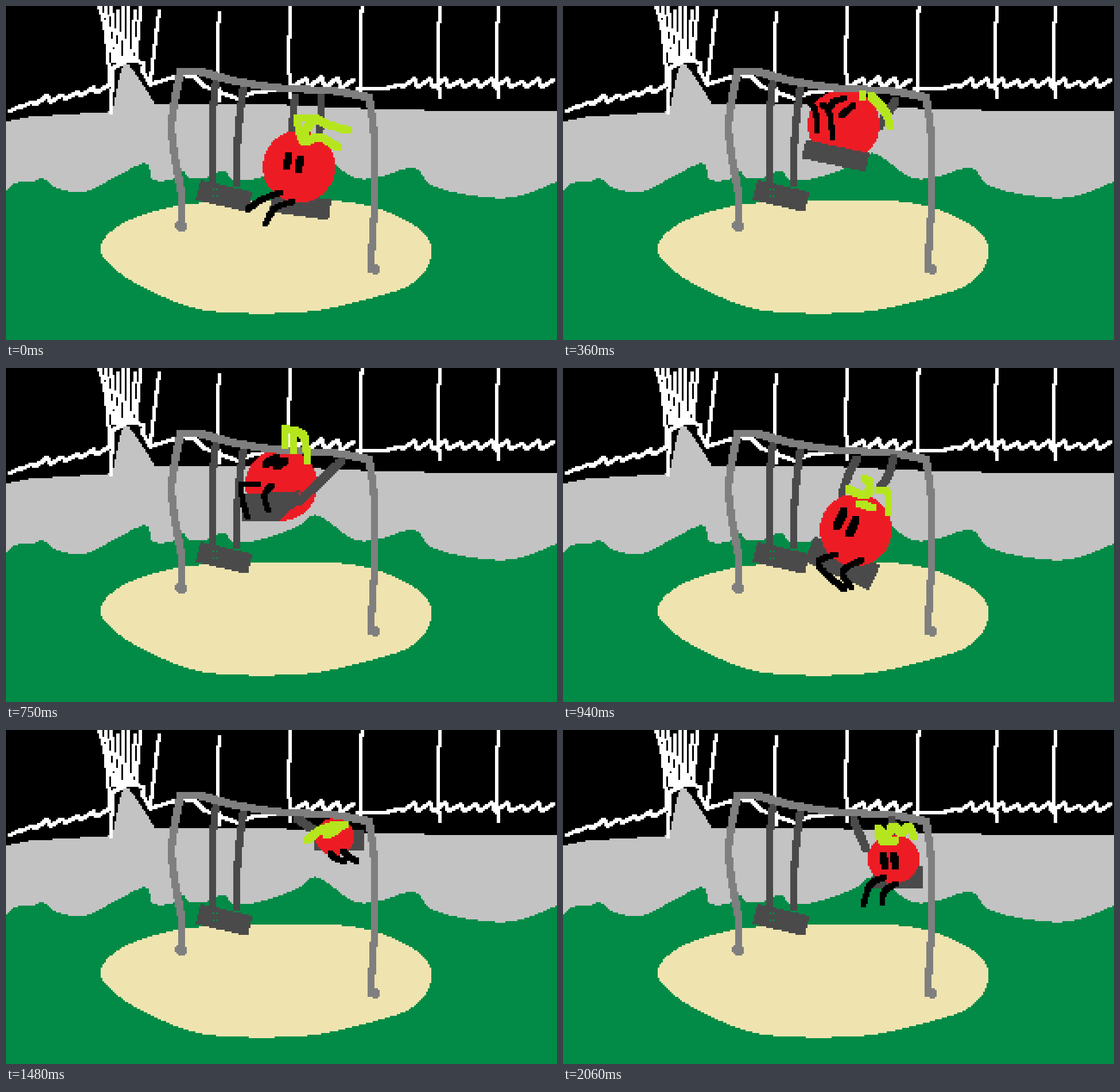
These frames come from a looping animation (960x582 px, 2240 ms). An HTML page with a canvas:

```html
<!DOCTYPE html>
<html lang="en">
<head>
<meta charset="utf-8">
<title>Tomato on a swing</title>
<style>
  html, body { margin: 0; width: 100%; height: 100%; overflow: hidden; background: #000; }
  canvas { display: block; width: 960px; height: 582px; image-rendering: pixelated; }
</style>
</head>
<body>
<canvas id="stage" width="320" height="194"></canvas>
<script>
// Coordinates are stage pixels; everything is rasterised hard-edged on a 3px grid.
const CELL = 3, W = 320, H = 194;
const ROCK = '#c3c3c3', GRASS = '#028b46', SAND = '#efe4b0', STEEL = '#7f7f7f';
const DARK = '#4a4a4a', RED = '#ed1c24', LIME = '#b5e61d', INK = '#000', WHITE = '#fff';

const stage = document.getElementById('stage').getContext('2d');
const backdrop = document.createElement('canvas');
backdrop.width = W;
backdrop.height = H;
let ctx = backdrop.getContext('2d');

let seed = 7;
function random() {
  seed = seed * 16807 % 2147483647;
  return seed / 2147483647;
}

const points = text => text.trim().split(/\s+/).map(p => p.split(',').map(Number));

// Catmull-Rom spline through a few key points
function curve(text, closed = false) {
  const pts = points(text), n = pts.length, out = [];
  const at = i => closed ? pts[(i + n) % n] : pts[Math.min(n - 1, Math.max(0, i))];
  for (let i = 0; i < (closed ? n : n - 1); i++) {
    const [a, b, c, d] = [-1, 0, 1, 2].map(k => at(i + k));
    for (let s = 0; s < 8; s++) {
      const t = s / 8;
      out.push([0, 1].map(k => b[k] + t / 2 * (c[k] - a[k]
        + t * (2 * a[k] - 5 * b[k] + 4 * c[k] - d[k]
        + t * (3 * (b[k] - c[k]) + d[k] - a[k])))));
    }
  }
  if (!closed) out.push(pts[n - 1]);
  return out;
}

function line(color, size, pts) {
  ctx.fillStyle = color;
  pts.forEach(([x, y], i) => {
    const [px, py] = pts[Math.max(0, i - 1)];
    const steps = Math.max(1, Math.ceil(Math.hypot(x - px, y - py)));
    for (let s = 0; s <= steps; s++) {
      const k = s / steps;
      ctx.fillRect(Math.round((px + (x - px) * k) / CELL - size / 2),
                   Math.round((py + (y - py) * k) / CELL - size / 2), size, size);
    }
  });
}

function area(color, pts) {
  ctx.fillStyle = color;
  for (let row = 0; row < H; row++) {
    const y = (row + 0.5) * CELL, hits = [];
    pts.forEach(([ax, ay], i) => {
      const [bx, by] = pts[(i + 1) % pts.length];
      if ((ay <= y) !== (by <= y)) hits.push(ax + (y - ay) * (bx - ax) / (by - ay));
    });
    hits.sort((a, b) => a - b);
    for (let i = 0; i + 1 < hits.length; i += 2) {
      const left = Math.round(hits[i] / CELL);
      ctx.fillRect(left, row, Math.round(hits[i + 1] / CELL) - left, 1);
    }
  }
}

function oval(color, x, y, rx, ry = rx) {
  area(color, Array.from({ length: 64 }, (_, i) => {
    const a = i * Math.PI / 32;
    return [x + rx * Math.cos(a), y + ry * Math.sin(a)];
  }));
}

// A plank: rectangle about its centre, tilted by some degrees
function seat(x, y, w, h, tilt = 0) {
  const a = tilt * Math.PI / 180, c = Math.cos(a), s = Math.sin(a);
  area(DARK, [[-1, -1], [1, -1], [1, 1], [-1, 1]].map(([i, j]) =>
    [x + (i * w * c - j * h * s) / 2, y + (i * w * s + j * h * c) / 2]));
}

const strokes = (color, size) => (...paths) => paths.forEach(p => line(color, size, curve(p)));
const rope = strokes(DARK, 4);
const leaf = strokes(LIME, 4);
const legs = strokes(INK, 3);
const pole = strokes(STEEL, 4);
const ball = (x, y, rx, ry) => oval(RED, x, y, rx, ry);
const bar = () => pole('305,113 340,115 400,131 480,143 570,148 632,159');

// Two parallel eyes: centre of the first, its half length, step to the second
function eyes(x, y, dx, dy, gapX = 20, gapY = 5) {
  for (const k of [0, 1]) {
    const cx = x + k * gapX, cy = y + k * gapY;
    line(INK, 4, [[cx - dx, cy - dy], [cx + dx, cy + dy]]);
  }
}

// Saw-toothed skyline: slow climbs, quick drops
function saw(x0, x1, y0, y1, height, tooth) {
  const pts = [];
  for (let x = x0; x < x1; x += tooth) {
    const y = y0 + (y1 - y0) * (x - x0) / (x1 - x0);
    pts.push([x, y], [x + tooth * 0.8, y - height * (0.75 + random() / 2)]);
  }
  line(WHITE, 2, pts);
}

function drawSky() {
  ctx.fillStyle = INK;
  ctx.fillRect(0, 0, W, H);
  area(ROCK, points('0,201 40,193 186,184 260,172 480,172 600,178 747,182 960,183 960,400 0,400'));
  area(ROCK, curve('186,184 192,150 202,108 212,101 230,125 261,172'));

  line(WHITE, 2, points('5,184 24,175'));
  saw(24, 180, 177, 147, 13, 26.6);
  line(WHITE, 2, points('184,186 185,108 212,96 240,98 238,112 251,137 305,120 330,124 345,140 405,162 432,150 475,147 500,138'));
  saw(500, 610, 140, 144, 15, 28);
  line(WHITE, 2, points('612,145 660,144 690,137'));
  saw(690, 960, 142, 142, 14, 27);

  // Rays fanning out of the peak, then the tall posts
  strokes(WHITE, 2)('163,0 174,50 181,137', '267,8 261,55 251,137');
  for (let i = 0; i < 7; i++) {
    line(WHITE, 2, [[173 + 10.3 * i, i % 3 * 4], [187 + 6.5 * i, 96]]);
  }
  [372, 496, 620, 756, 858].forEach((x, i) => {
    const post = [];
    for (let y = i ? 0 : 13; y < 166; y += 8) post.push([x - 3 * Math.sin(y / 55), y]);
    line(WHITE, 2, post);
  });
}

function drawGround() {
  const hills = curve(`0,323 15,309 45,306 66,301 90,318 140,323 190,298 243,274 256,302 290,302
    308,287 320,300 350,299 378,287 400,304 450,297 510,275 543,257 605,298 650,298 710,282
    745,314 825,332 890,332 960,306`);
  area(GRASS, [...hills, [960, 582], [0, 582]]);
  area(SAND, curve(`165,420 205,378 300,348 428,340 600,342 695,373 738,410 737,448 707,484
    640,508 520,533 360,532 270,505 195,463`, true));
}

function drawFrame() {
  rope('366,128 361,180 360,305', '413,146 404,225 402,310');
  seat(380, 331, 93, 36, 13);
  for (const x of [361, 368]) for (const y of [320, 331]) line(GRASS, 1, [[x, y]]);
  pole('304,113 289,200 294,262 306,330 305,380', '633,160 642,235 642,340 637,430 637,458');
  oval(STEEL, 305, 383, 10.5);
  oval(STEEL, 643, 459, 9);
  bar();
}

// Swing positions shared by several poses
function hang() {
  rope('504,158 500,190 499,222', '550,158 549,200 545,216');
  seat(513, 348, 104, 36, 8);
}
function lean() {
  rope('512,158 498,185 485,222', '576,156 568,185 552,210');
  seat(486, 340, 125, 48, 24);
}
function high() {
  area(DARK, points('413,220 512,214 507,238 475,266 412,266'));
  rope('585,162 545,200 510,233');
}
function away() {
  rope('506,157 517,182 529,208', '573,156 578,182');
  seat(583, 257, 88, 37);
}
function back() {
  rope('508,155 541,178');
  seat(580, 192, 88, 34);
}

const poses = [
  [0, () => {
    hang();
    ball(510.5, 280, 63);
    leaf('506,196 535,195 560,206 597,217', '507,196 518,235 545,228 578,246', '535,197 515,228');
    eyes(491, 270, -2, 9);
    legs('477,325 445,338 420,355', '500,341 468,353 452,380');
  }],
  [180, () => {
    lean();
    ball(500, 274, 63);
    leaf('500,198 535,197 580,222', '500,198 518,232 565,246');
    eyes(477, 258, -4, 11, 22);
    legs('462,320 430,325 401,334', '482,336 445,350 408,362');
  }],
  [360, () => {
    rope('580,165 550,210');
    ball(489, 207, 63, 61);
    bar();
    seat(475, 261, 114, 33, 12);
    leaf('522,152 522,159', '536,156 562,185 570,210');
    legs('430,167 440,185 443,218', '452,172 464,185 470,230', '463,180 472,167 490,161');
    legs('485,191 506,173');
  }],
  [550, () => {
    ball(482, 206, 63);
    bar();
    high();
    leaf('508,150 520,117 544,140 550,168');
    eyes(457, 175, -7, 8, 21);
    legs('428,208 402,197 380,188', '450,230 415,224 386,217');
  }],
  [750, () => {
    ball(480, 203, 63);
    bar();
    high();
    leaf('487,106 486,134', '488,106 518,118 525,162', '500,110 500,145');
    eyes(462, 162, -8, 5, 16);
    legs('439,202 410,202', '410,202 412,230 420,258', '462,206 450,222 456,246');
  }],
  [940, () => {
    lean();
    ball(510.5, 282, 63);
    leaf('497,211 526,222 535,203 526,193', '516,236 541,244', '548,214 565,216 568,253');
    eyes(484, 262, -6, 13, 21, 14);
    legs('474,325 444,342 489,385', '520,335 487,354 502,383');
  }],
  [1120, () => {
    hang();
    ball(516, 278, 62);
    leaf('490,222 526,220 528,196', '508,235 535,238', '545,220 562,240');
    eyes(502, 266, -4, 13, 20, 9);
    legs('485,331 478,354 498,382', '522,338 511,360 530,381');
  }],
  [1300, () => {
    away();
    ball(568, 217, 41, 40);
    leaf('495,254 530,245 578,205', '579,192 545,196 519,225', '575,196 545,214 560,222');
    eyes(556, 236, 1, 3, 16, -2);
    legs('566,257 567,276 590,286', '586,255 587,275 606,294');
  }],
  [1480, () => {
    back();
    ball(573, 186, 34, 33);
    leaf('575,164 545,176 524,193', '590,164 558,184');
    bar();
    legs('565,214 573,223 590,229', '586,211 598,221 611,228');
  }],
  [1670, () => {
    back();
    ball(575, 178, 31, 29);
    bar();
    leaf('560,162 576,158 597,163');
    legs('563,201 559,214 566,229', '584,204 581,217 588,229');
  }],
  [1870, () => {
    back();
    ball(575, 179, 32, 29);
    leaf('567,157 569,167', '578,170 596,172 597,160');
    bar();
    legs('562,200 552,214 557,240', '583,206 576,218 577,240');
  }],
  [2060, () => {
    away();
    ball(576, 225, 45, 42);
    leaf('550,172 563,186 575,168 590,180 603,168 611,186', '550,182 560,194 580,193');
    eyes(559, 227, 2, 9, 19, 0);
    legs('558,257 535,270 524,303', '580,267 560,282 557,301');
  }]
];

drawSky();
drawGround();
drawFrame();
ctx = stage;

const LOOP = 2240, start = performance.now();
let shown = null;
function tick(now) {
  const t = Math.max(0, now - start) % LOOP;
  const pose = poses.findLast(p => p[0] <= t);
  if (pose !== shown) {
    shown = pose;
    ctx.drawImage(backdrop, 0, 0);
    pose[1]();
  }
  requestAnimationFrame(tick);
}
tick(start);
</script>
</body>
</html>
```
